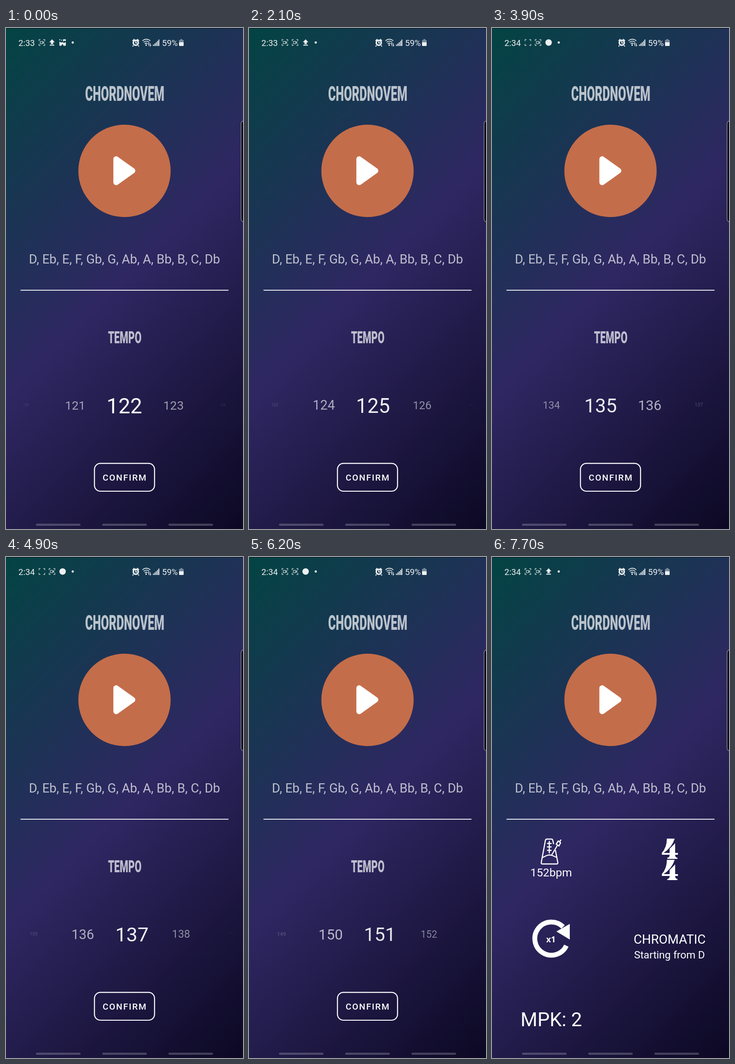
Animation, 515 px wide and 1087 px high, one loop 8000 ms. Source, as an HTML page:

```html
<!DOCTYPE html>
<html lang="en">
<head>
<meta charset="utf-8">
<title>Tempo picker</title>
<style>
  html, body { margin: 0; width: 100%; height: 100%; overflow: hidden; background: #0c0823; }
  body { background: linear-gradient(135deg, #034443 0%, #2f2762 50%, #0c0823 100%); }
  svg { display: block; width: 100vw; height: 100vh; font-family: Roboto, sans-serif; fill: #fff; }
  .mid { text-anchor: middle; }
  .soft { fill: rgba(255, 255, 255, .7); }
  .head { font-weight: 900; text-anchor: middle; }
  .line { fill: none; stroke: #fff; }
  #status { opacity: .93; }
</style>
</head>
<body>
<svg viewBox="0 0 515 1087">
  <defs>
    <path id="brackets" class="line" stroke-width="1.3" opacity=".85" d="M.7 4V.7H4M10 .7h3.300V4M13.300 10v3.300H10M4 13.300H.7V10"/>
    <g id="cam">
      <use href="#brackets"/>
      <path class="line" stroke-width="1.100" opacity=".85" d="M3.400 4.600h5v5h-5zM8.400 6.800l2.600-1.800v4l-2.600-1.600"/>
    </g>
    <path id="upload" d="M7 0l6 6.500H9.500V10.500h-5V6.500H1zM2 11.800h10v2H2z"/>
    <path id="gallery" d="M0 0h2v2H0zM4 0l2 2-2 2zM8 0h6v4l-3-1-3 2zM0 5l4 2 3-1 3 2 4-2v8H9l-2-4-3 4H0z"/>
    <circle id="badge" cx="7" cy="7" r="7"/>
    <path id="four" d="M380 611H397Q391 630 373 642H386V633L398 621V642H404V646H398Q398 652 403 652.500V655H381V652.500Q386 652 386 646H369V642Q380 630 380 611z"/>
  </defs>

  <rect width="515" height="1" fill="#08121c"/>

  <g id="status" font-size="18.500">
    <text id="clock" x="27" y="38.500">2:33</text>
    <use id="slot0" x="71" y="24.500"/>
    <use id="slot1" x="93" y="24.500"/>
    <use id="slot2" x="116" y="24.500"/>
    <circle cx="145" cy="31.500" r="2.400"/>
    <g class="line" stroke-width="2">
      <circle cx="282" cy="32" r="5.400" stroke-width="3.200"/>
      <path d="M275 28l4-4M289 28l-4-4M277 38l-2 2M287 38l2 2M282 28.500V32.500h3"/>
      <path stroke-width="1.700" d="M296.500 28a12 12 0 0 1 17 0M299 31a8.500 8.500 0 0 1 12 0M301.500 34a5 5 0 0 1 6 0"/>
      <path stroke-width="1.300" d="M310.500 39v-6l-1.500 2M313.500 33v6l1.500-2"/>
      <path stroke-width="1.900" d="M320.500 39v-3M323.500 39v-5.500M326.500 39v-8M329.500 39v-11M332.200 39v-14"/>
    </g>
    <circle cx="304.500" cy="37" r="1.700"/>
    <text x="339" y="38.500">59%</text>
    <path opacity=".45" d="M379 24h4v2h3v5h-10v-5h3z"/>
    <path d="M376 31h10v6.500q0 1.500-1.500 1.500h-7q-1.500 0-1.500-1.500z"/>
  </g>

  <text class="head soft" font-size="43.500" transform="translate(258 158) scale(.58 1)">CHORDNOVEM</text>
  <circle cx="257.500" cy="310" r="100.300" fill="#c46d4a"/>
  <path d="M239.300 284.300v50.800l35.700-25.400z" stroke="#fff" stroke-width="12" stroke-linejoin="round"/>
  <text class="mid soft" x="257.500" y="510.500" font-size="27.500">D, Eb, E, F, Gb, G, Ab, A, Bb, B, C, Db</text>
  <path class="line" stroke-width="1.600" d="M31.500 568.900H483.500"/>

  <g id="picker">
    <text class="head soft" font-size="36.800" transform="translate(258 684) scale(.58 1)">TEMPO</text>
    <g id="wheel" class="mid" font-size="46"></g>
    <rect class="line" stroke-width="2.200" x="192.200" y="944.700" width="130.600" height="60.300" rx="13"/>
    <text x="210" y="982.300" font-size="19" font-weight="500" letter-spacing="1.900">CONFIRM</text>
  </g>

  <g id="settings">
    <g class="line" stroke-width="2.400" stroke-linejoin="round" stroke-linecap="round">
      <path d="M138 637l5 26q.5 3-2.500 3h-31q-3 0-2.500-3l9-48q.6-3 3.500-3h9.500q2.500 0 3.200 3l1.500 7"/>
      <path d="M110 652l8-4q7-3 14 0l9 4M124.500 617v25M120.500 621.500h8M120.500 629h8M120.500 636.500h8"/>
      <path d="M130 646l12-20M139.500 623l6 4 3.500-7-5-4zM147 618l2.500-4"/>
    </g>
    <text class="mid" x="128.500" y="693" font-size="24.600">152bpm</text>
    <use href="#four"/>
    <use href="#four" y="46"/>
    <path class="line" stroke-width="10.500" d="M161.600 843.200A36 36 0 1 1 154.500 802.500"/>
    <path d="M169 796v34l-29-17.500z"/>
    <text class="mid" x="128" y="835.500" font-family="Open Sans, sans-serif" font-weight="700" font-size="18">x1</text>
    <text class="mid" x="386" y="838.500" font-size="27.700">CHROMATIC</text>
    <text class="mid" x="385.700" y="871" font-size="22.700">Starting from D</text>
    <text x="62" y="1018" font-size="42">MPK: 2</text>
  </g>

  <rect x="510.700" y="201.500" width="20" height="219" rx="6" fill="#0b0816" stroke="#85839a" stroke-width="1.500"/>
  <g fill-opacity=".22">
    <rect x="65" y="1075.500" width="97" height="4.500" rx="2.200"/>
    <rect x="209" y="1075.500" width="97" height="4.500" rx="2.200"/>
    <rect x="353" y="1075.500" width="97" height="4.500" rx="2.200"/>
  </g>
</svg>
<script>
const LOOP = 8000, STEP = 100;
const CENTER = 257.2, SPACING = 106.8, REACH = 249.5;

// [time, wheel position]: drags, rests and flings
const track = [
  [0, 122], [300, 123], [900, 123], [1000, 122.988], [1900, 124.85], [2100, 124.885],
  [2300, 124.885], [3300, 127.347], [3700, 133], [3900, 135.2], [4100, 136], [4700, 136],
  [4800, 136.3], [4900, 136.846], [6200, 150.747], [6400, 151.7], [6600, 152]
];

const byId = id => document.getElementById(id);
const clamp = v => Math.min(1, Math.max(0, v));
const wheel = byId('wheel');
const labels = Array.from({ length: 5 }, () =>
  wheel.appendChild(document.createElementNS('http://www.w3.org/2000/svg', 'text')));

function positionAt(t) {
  const i = track.findIndex(([time]) => time > t);
  if (i < 0) return track[track.length - 1][1];
  const [t0, p0] = track[i - 1], [t1, p1] = track[i];
  return p0 + (p1 - p0) * (t - t0) / (t1 - t0);
}

function drawWheel(position) {
  const nearest = Math.round(position);
  labels.forEach((label, i) => {
    const value = nearest + i - 2;
    const offset = (value - position) * SPACING;
    const scale = clamp(1 - Math.abs(offset) / REACH);
    label.textContent = value;
    label.setAttribute('opacity', scale);
    label.setAttribute('transform',
      `translate(${CENTER + offset} ${817 + 18.5 * scale}) scale(${scale})`);
  });
}

function drawStatus(t) {
  const late = t >= 2700;
  const blank = t < 7600 && Math.floor((t - 100) / 500) % 2 === 1;
  const icons = t < 200 ? ['cam', 'upload', 'gallery']
    : [blank ? 'brackets' : 'cam', 'cam', late && t < 7400 ? 'badge' : 'upload'];
  icons.forEach((name, i) => byId('slot' + i).setAttribute('href', '#' + name));
  byId('clock').textContent = late ? '2:34' : '2:33';
}

const start = performance.now();

function draw() {
  const t = Math.floor((performance.now() - start) % LOOP / STEP) * STEP;
  drawWheel(positionAt(t));
  drawStatus(t);
  byId('picker').setAttribute('opacity', clamp((7500 - t) / 200));
  byId('settings').setAttribute('opacity', clamp((t - 7400) / 300));
  requestAnimationFrame(draw);
}
draw();
</script>
</body>
</html>
```
